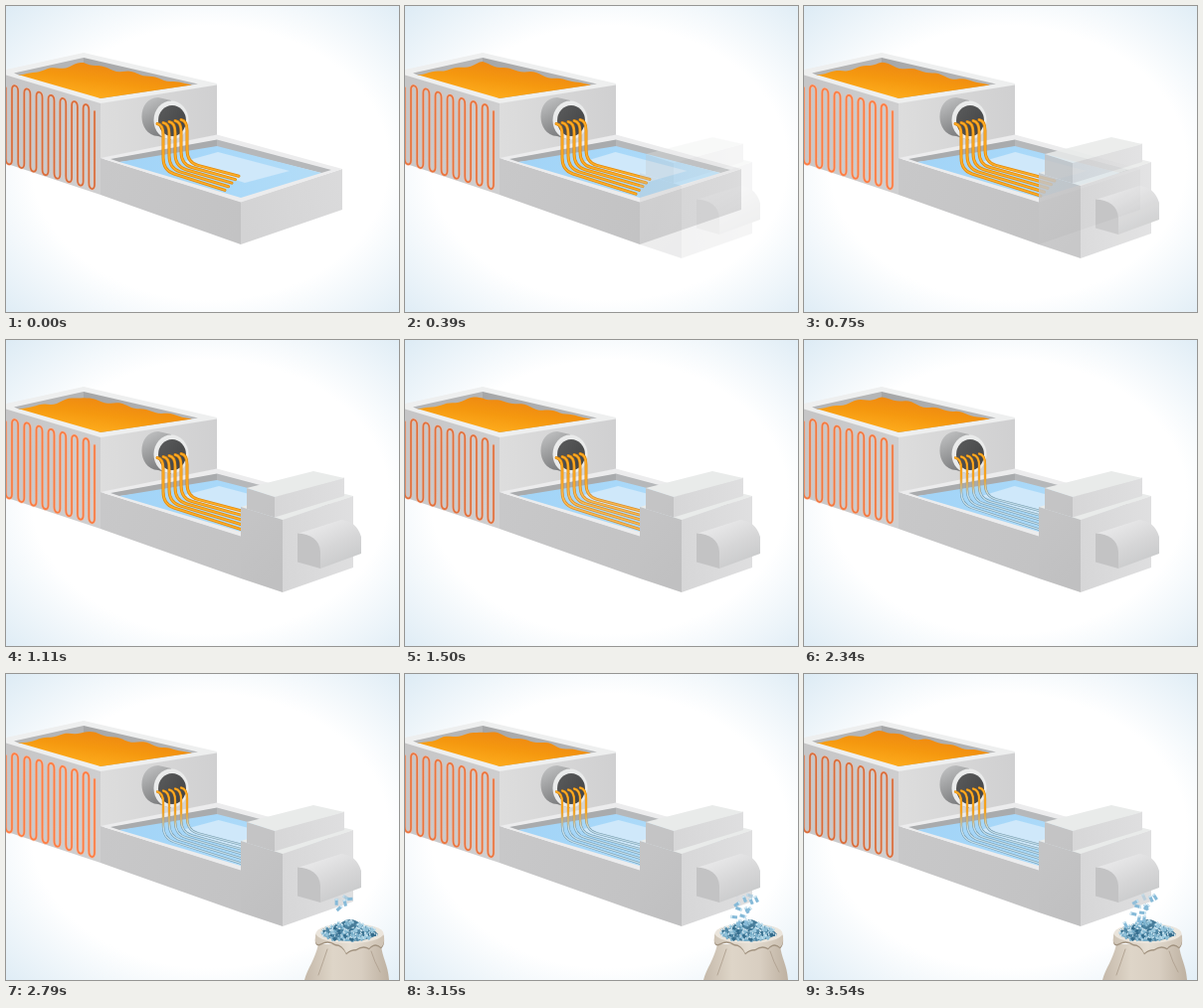
An HTML page with a canvas that plays this animation: 395x308 px, repeating every 3.57 s.

```html
<!DOCTYPE html>
<html lang="en">
<head>
<meta charset="utf-8">
<title>Pellet line</title>
<style>
html, body { margin: 0; width: 100%; height: 100%; overflow: hidden; background: #fff; }
canvas { display: block; width: 395px; height: 308px; }
</style>
</head>
<body>
<canvas id="stage"></canvas>
<script>
const W = 395, H = 308, LOOP = 3570, TAU = Math.PI * 2;
const scale = Math.max(1, window.devicePixelRatio || 1);

function setup(canvas) {
  canvas.width = W * scale;
  canvas.height = H * scale;
  const c = canvas.getContext('2d');
  c.scale(scale, scale);
  c.lineCap = c.lineJoin = 'round';
  return c;
}
const stage = setup(document.getElementById('stage'));

function layer(paint) {
  const canvas = document.createElement('canvas');
  paint(setup(canvas));
  return canvas;
}

function put(canvas, alpha) {
  if (alpha <= 0) return;
  stage.globalAlpha = alpha;
  stage.drawImage(canvas, 0, 0, W, H);
  stage.globalAlpha = 1;
}

const ramp = (t, from, to) => Math.min(1, Math.max(0, (t - from) / (to - from)));
const blend = (a, b, k) => a.map((v, i) => Math.round(v + (b[i] - v) * k));
const rgb = color => `rgb(${color})`;

function grad(c, x0, y0, x1, y1, ...colors) {
  const g = c.createLinearGradient(x0, y0, x1, y1);
  colors.forEach((color, i) => g.addColorStop(i / (colors.length - 1), color));
  return g;
}

function poly(c, fill, ...p) {
  c.beginPath();
  for (let i = 0; i < p.length; i += 2) c.lineTo(p[i], p[i + 1]);
  c.closePath();
  c.fillStyle = fill;
  c.fill();
}

function shape(c, fill, d) {
  c.fillStyle = fill;
  c.fill(new Path2D(d));
}

function oval(c, fill, x, y, rx, ry) {
  c.beginPath();
  c.ellipse(x, y, rx, ry, 0, 0, TAU);
  c.fillStyle = fill;
  c.fill();
}

function random(seed) {
  return () => (seed = seed * 16807 % 2147483647) / 2147483647;
}

function pellet(c, x, y, angle, color, size = 1) {
  c.save();
  c.translate(x, y);
  c.rotate(angle);
  c.fillStyle = color;
  c.fillRect(-3 * size, -1.4 * size, 6 * size, 2.8 * size);
  c.fillStyle = '#d4e9f3';
  c.fillRect(-3 * size, -1.4 * size, 1.4 * size, 2.8 * size);
  c.restore();
}

// Everything that never moves
const base = layer(c => {
  c.fillStyle = '#fff';
  c.fillRect(0, 0, W, H);
  c.save();
  c.translate(205, 158);
  c.scale(1.3, 1);
  const glow = c.createRadialGradient(0, 0, 138, 0, 0, 245);
  glow.addColorStop(0, '#fff');
  glow.addColorStop(1, '#d4e6f2');
  c.fillStyle = glow;
  c.fillRect(-W, -H, 2 * W, 2 * H);
  c.restore();

  // upper tank
  poly(c, grad(c, 0, 110, 95, 130, '#c6c6c7', '#cfcfd0'), 0, 67, 95, 95, 95, 190, 0, 158.5);
  poly(c, grad(c, 95, 120, 212, 110, '#dddddd', '#d0d0d1'), 95, 95, 212, 78, 212, 131, 95, 155);
  poly(c, '#eeefef', 0, 64, 78, 47, 212, 78, 212, 79.5, 95, 98, 0, 69.5);
  poly(c, '#b4b5b6', 8, 67.5, 78, 52, 78, 70, 14, 70);
  poly(c, grad(c, 78, 55, 192, 79, '#a5a6a7', '#b6b7b8'), 78, 52, 193, 78.5, 95, 93, 78, 85);

  // lower tank
  poly(c, grad(c, 95, 170, 236, 215, '#c8c8c9', '#c3c3c4'), 95, 153, 236, 197, 236, 240, 95, 190);
  poly(c, grad(c, 236, 215, 338, 185, '#d3d3d4', '#dadadb'), 236, 197, 338, 164, 338, 205, 236, 240);
  poly(c, '#ececed', 95, 153, 212, 129.5, 338, 164, 236, 197.5);
  poly(c, '#a9abad', 105, 154, 212, 134.5, 212, 145, 114, 157);
  poly(c, '#b6b8ba', 212, 134.5, 327, 165, 317, 168, 212, 142);

  // pipe
  shape(c, grad(c, 138, 95, 158, 132, '#c0c1c2', '#9b9c9d', '#77787a'),
    'M153 92 C131 92 131 130 153 131 L166 135 L166 95 Z');
  oval(c, '#eaebeb', 166, 115, 17.5, 19.5);
  oval(c, grad(c, 152, 104, 178, 127, '#5a5b5c', '#434445'), 167, 115.5, 14, 15.5);
});

const extruder = layer(c => {
  const side = grad(c, 236, 190, 278, 230, '#c4c4c5', '#c0c0c1');
  const front = grad(c, 270, 200, 349, 190, '#d6d6d7', '#dfdfe0');
  poly(c, '#e9ebea', 236, 168, 309, 147, 349, 157, 278, 181.5);
  poly(c, side, 236, 168, 278, 181, 278, 254, 236, 240);
  poly(c, front, 278, 181, 349, 157, 349, 229, 278, 254);
  poly(c, side, 242, 149, 270, 157.5, 270, 178.5, 242, 170);
  poly(c, front, 270, 157.5, 340, 138.5, 340, 157, 270, 178.5);
  poly(c, '#e9ebea', 242, 149, 309, 132, 340, 139, 270, 158);
  // outlet hood
  shape(c, grad(c, 318, 187, 337, 228, '#e6e6e7', '#d6d6d7', '#c9cacb'),
    'M293 195 L337 181 Q352 182 357 198 V215 L316 230 V211 Z');
  shape(c, '#c3c3c4', 'M293 194.5 C306 195 315 201 316 213 V230 L293 223.5 Z');
});

const bag = layer(c => {
  shape(c, grad(c, 300, 290, 386, 290, '#c5b9aa', '#ded5c8', '#d8cec1', '#bdb0a0'),
    'M300 308 C303 296 310 289 314 272 H377 C378 286 384 292 385 308 Z');
  c.strokeStyle = '#b3a594';
  c.lineWidth = 1;
  c.stroke(new Path2D('M323 277 Q319 289 314 303 M367 279 Q370 289 376 300'));
  const cuff = 'M312 260 C309 270 312 274 317 271 Q324 267 331 272 Q338 272 342 281 '
    + 'Q346 277 352 277 Q359 272 365 276 Q371 269 377 275 C382 271 380 262 378 259 Z';
  c.save();
  c.translate(0, 1.5);
  shape(c, '#a29380', cuff);
  c.restore();
  shape(c, grad(c, 311, 265, 381, 265, '#cfc4b5', '#e6dfd4', '#cdc1b2'), cuff);
  oval(c, '#ebe5dc', 345.5, 261, 34, 10);
  shape(c, '#477c99', 'M317 262 Q325 254 335 252 Q346 242 357 252 Q368 254 374 262 Q363 269 346 269 Q328 269 317 262 Z');
  const rnd = random(71);
  const colors = ['#4f88a7', '#7ab0cb', '#9cc9de', '#346d8d', '#8bbdd5'];
  for (let i = 0; i < 115; i++) {
    const a = rnd() * TAU, r = Math.sqrt(rnd());
    const x = Math.cos(a) * r;
    const lift = Math.sin(a) * r;
    pellet(c, 345.5 + x * 27, 261 + lift * (lift < 0 ? 12.5 * (1 - x * x * 0.45) : 7),
      rnd() * Math.PI, colors[i % 5], 0.85);
  }
});

// Serpentine heater; the pitch narrows towards the right
const coil = new Path2D();
const coilX = i => 89 - 5.65 * (14 - i) - 0.02 * (14 - i) ** 2;
for (let i = -1; i < 15; i++) {
  const x = coilX(i), next = coilX(i + 1);
  const top = 80.5 + x * 0.265, bottom = 155.5 + x * 0.295;
  if (i < 0) coil.moveTo(x, top + 2);
  if (i % 2) {
    coil.lineTo(x, bottom - 2);
    coil.bezierCurveTo(x, bottom + 5, next, bottom + 6, next, bottom);
  } else {
    coil.lineTo(x, top + 2);
    if (i < 14) coil.bezierCurveTo(x, top - 4, next, top - 3, next, top + 4);
  }
}

function drawCoil(t) {
  const heat = (1 - Math.cos(t / LOOP * 2 * TAU)) / 2;
  stage.strokeStyle = `rgba(255, 178, 145, ${0.3 + heat * 0.25})`;
  stage.lineWidth = 3.2;
  stage.stroke(coil);
  stage.strokeStyle = rgb(blend([218, 108, 57], [255, 125, 65], heat));
  stage.lineWidth = 1.7;
  stage.stroke(coil);
}

function drawMelt(t) {
  const phase = t / LOOP * TAU;
  const p = [12, 69];
  for (let x = 15; x <= 180; x += 3) {
    const rim = x < 77 ? 69.5 - (x - 14) * 0.19 : 57.5 + (x - 77) * 0.2;
    const fade = Math.min(1, (x - 14) / 25, (182 - x) / 25);
    const wave = Math.sin(x * 0.24 - phase * 2) + 0.7 * Math.sin(x * 0.13 + phase);
    p.push(x, rim + fade * wave);
  }
  poly(stage, grad(stage, 100, 58, 95, 93, '#ee8812', '#f5980f', '#fdab1c'), ...p, 187, 79.6, 95, 93);
}

function drawWater(t) {
  const s = Math.sin(t / LOOP * TAU * 2) * 1.5;
  poly(stage, grad(stage, 120, 150, 300, 180, '#a2d4f7', '#a8d8f9', '#b2dcf7'),
    114, 157, 212, 141, 317, 168, 236, 193);
  poly(stage, '#cfe8fa', 177 + s, 157, 213 - s, 147, 285 - s, 166, 240 + s, 178);
}

const EDGE = [[224, 137, 12], [196, 150, 112], [112, 151, 171]];
const CORE = [[255, 174, 38], [238, 208, 176], [195, 221, 234]];

function drawStrands(t) {
  const cool = ramp(t, 1350, 2310);
  const reach = Math.min(18, t * 12 / 390);
  const tint = ([hot, warm, cold]) => {
    const now = cool < 0.5 ? blend(hot, warm, cool * 2) : blend(warm, cold, cool * 2 - 1);
    return grad(stage, 0, 138, 0, 156, rgb(hot), rgb(now));
  };
  const edge = tint(EDGE), core = tint(CORE);
  for (let i = 4; i >= 0; i--) {
    const x = 158 + i * 6;
    const top = 118.5 - i;
    const bend = 165.5 - i * 2;
    const slope = 0.32 - i * 0.014;
    const tip = 220 + i * 3.5 + reach;
    const path = new Path2D();
    path.moveTo(x - 6, top);
    path.quadraticCurveTo(x, top + 1, x, top + 11);
    path.lineTo(x, bend - 13);
    path.quadraticCurveTo(x, bend, x + 11, bend + 11 * slope);
    path.lineTo(tip, bend + (tip - x) * slope);
    stage.strokeStyle = edge;
    stage.lineWidth = 3 - cool * 0.7;
    stage.stroke(path);
    stage.strokeStyle = core;
    stage.lineWidth = 1.5 - cool * 0.2;
    stage.stroke(path);
  }
}

const drops = (() => {
  const rnd = random(29);
  return Array.from({ length: 13 }, (_, i) => ({
    delay: i / 13, x: 332 + rnd() * 22, drift: rnd() * 24 - 12, spin: rnd() * 3, turn: rnd() * 2 - 1
  }));
})();

function drawDrops(t) {
  const age = (t - 2620) / 430;
  for (const d of drops) {
    const k = age - d.delay;
    if (k < 0) continue;
    const f = k % 1;
    const y = 227 - (d.x - 332) * 0.35 + f * (17 + 13 * f);
    stage.globalAlpha = Math.min(1, f * 6);
    pellet(stage, d.x + d.drift * f, y, d.spin + d.turn * f * 2, '#86bad8', 1.1);
  }
  stage.globalAlpha = 1;
}

function draw(t) {
  put(base, 1);
  drawMelt(t);
  drawCoil(t);
  drawWater(t);
  drawStrands(t);
  put(extruder, ramp(t, 210, 840));
  put(bag, ramp(t, 2400, 2760));
  drawDrops(t);
}

const start = performance.now();
function tick() {
  draw((performance.now() - start) % LOOP);
  requestAnimationFrame(tick);
}
tick();
</script>
</body>
</html>
```
